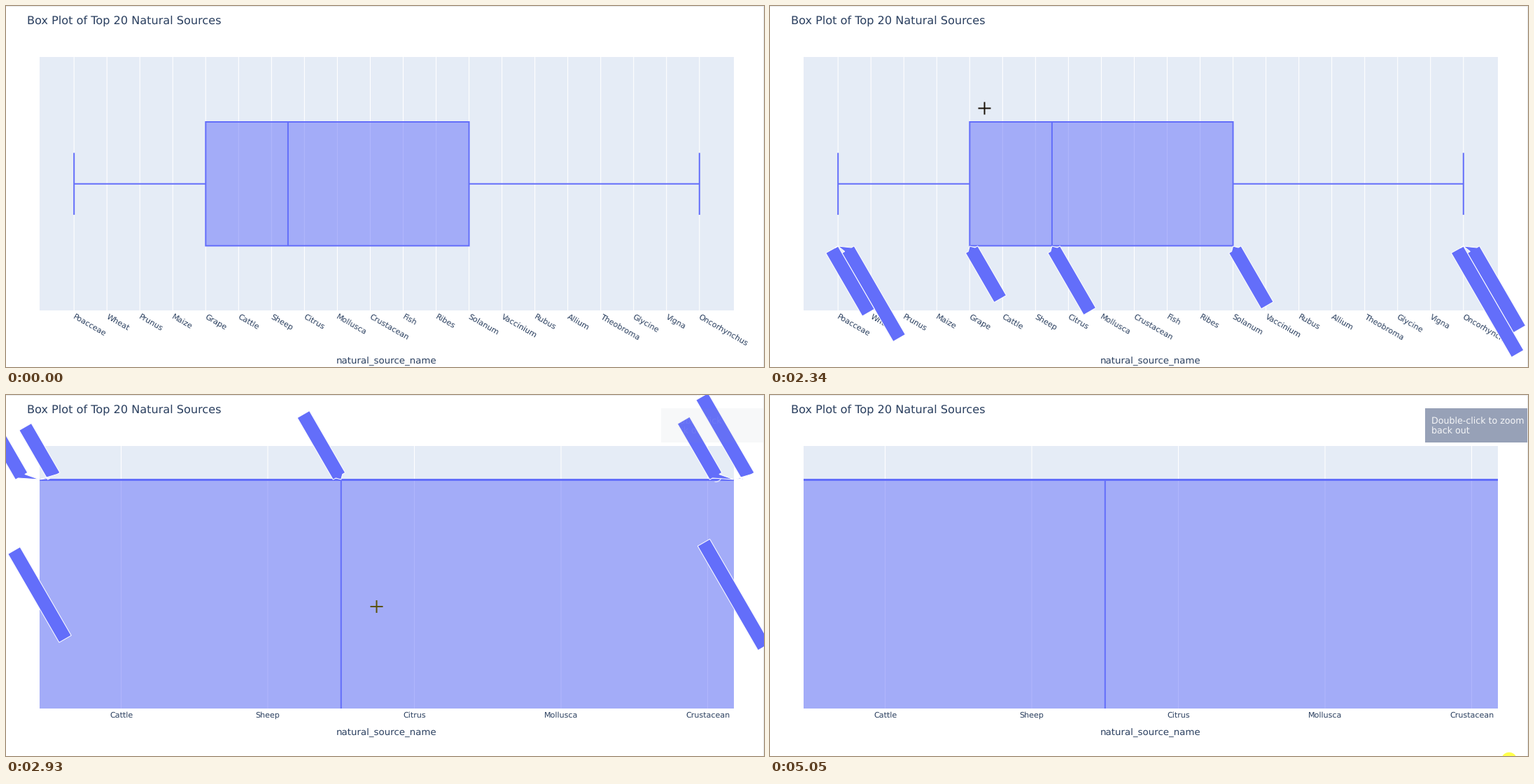
A matplotlib script that plays this animation: 1083x517 px, repeating every 5110 ms.

```python
import math

import numpy as np
import matplotlib.pyplot as plt
from matplotlib.animation import FuncAnimation
from matplotlib.colors import to_rgb
from matplotlib.patches import Circle, PathPatch, Polygon, Rectangle
from matplotlib.path import Path

plt.rcParams["text.hinting"] = "none"

W, H = 1083, 517
STEP, FRAMES = 35, 146
PX = 0.72  # points per pixel at 100 dpi

INK, PAPER, BLUE = "#2a3f5f", "#e5ecf6", "#636efa"
FILL = tuple(0.5 * a + 0.5 * b for a, b in zip(to_rgb(BLUE), to_rgb(PAPER)))
LEFT, TOP, RIGHT = 48, 73, 1040
WIDE_BOTTOM, ZOOM_BOTTOM = 436, 449
NAMES = ("Poacceae Wheat Prunus Maize Grape Cattle Sheep Citrus Mollusca "
         "Crustacean Fish Ribes Solanum Vaccinium Rubus Allium Theobroma "
         "Glycine Vigna Oncorhynchus").split()

# caption, category position, sideways steps when wide and when zoomed
STATS = [("(lower fence: Poacceae,  )", 0, 1, None),
         ("(min: Poacceae,  )", 0, -1, -2),
         ("(q1: Grape ,  )", 4, 0, 2),
         ("(median: Citrus,  )", 6.5, 0, 0),
         ("(q3: Solanum,  )", 12, 0, -2),
         ("(max: Oncorhynchus,  )", 19, 1, 2),
         ("(upper fence: Oncorhynchus,  )", 19, -1, None)]

# Times in ms
APPEAR, PRESS, DRAG, RELEASE, ZOOM, LAST_CLICK = 340, 2410, 2455, 2700, 2790, 5040
LAG = 22
HOME, ANCHOR = (1052, 530), (306.5, 146.5)
MOVES = [(APPEAR, 1110, (689, 385)), (1370, 1680, (441, 268)),
         (1920, 2300, ANCHOR), (DRAG, 2585, (529.5, 303)),
         (2990, 3420, (798, 350)), (3640, 3930, (947, 428)),
         (4270, 4540, (1056, 530))]

fig = plt.figure(figsize=(W / 100, H / 100), dpi=100, facecolor="white")
ax = fig.add_axes([0, 0, 1, 1])
ax.set_xlim(0, W)
ax.set_ylim(H, 0)
ax.axis("off")


def rect(x0, y0, x1, y1, color, z=1, **kw):
    return ax.add_patch(Rectangle((x0, y0), x1 - x0, y1 - y0, fc=color,
                                  lw=0, zorder=z, **kw))


def line(xs, ys, color=BLUE, width=2, z=3):
    return ax.plot(xs, ys, color=color, lw=width * PX, zorder=z, snap=False,
                   solid_capstyle="butt", solid_joinstyle="miter")[0]


def text(x, y, label, size, color=INK, z=2, font="DejaVu Sans", **kw):
    return ax.text(x, y, label, fontsize=size * PX, color=color, zorder=z,
                   family=font, va="baseline", rotation_mode="anchor", **kw)


def hover_label(tip, label, side=1, steps=0):
    """Tag turned by 60 degrees; side 1 hangs below, -1 rises, 0 is centred."""
    u = np.array([0.5, 0.75 ** 0.5])
    v = np.array([-u[1], u[0]])
    arrow, half, pad = 5.5, 10, 3.5
    caption = text(0, 0, label, 12, "white", 6, "Liberation Sans")
    length = caption.get_window_extent().width + 2 * pad
    shift = steps * half / u[1]
    along, across = shift * u[0], -shift * u[1]
    near = side * arrow + along if side else -length / 2
    far = near + (side or 1) * length
    pts = [(near, across + half), (far, across + half),
           (far, across - half), (near, across - half)]
    if side:
        pts = [(0, 0), (near, across + arrow)] + pts + [(near, across - arrow)]
    place = lambda a, b: np.array(tip) + a * u + b * v
    body = ax.add_patch(Polygon([place(*p) for p in pts], fc=BLUE, ec="white",
                                lw=PX, zorder=6))
    start = near + pad if side >= 0 else -arrow - pad
    caption.set(position=place(start, across + 4), rotation=-60,
                ha="left" if side >= 0 else "right")
    return [body, caption]


def view(first, step, bottom, box_top, box_bottom, title_y, tilt):
    """One box plot; all marks follow from the axis origin and step."""
    at = lambda i: first + step * i
    area = rect(LEFT, TOP, RIGHT, bottom, PAPER)
    marks, labels = [], []
    for i, name in enumerate(NAMES):
        x = at(i)
        if LEFT < x < RIGHT:
            marks.append(line([x, x], [TOP, bottom], "white", 1.1, 2))
            labels.append(text(x - 2, 447, name, 11.15, rotation=-30) if tilt
                          else text(x, 462, name, 11.15, ha="center"))
    low, q1, median, q3, high = map(at, (0, 4, 6.5, 12, 19))
    mid, cap = (box_top + box_bottom) / 2, (box_bottom - box_top) / 4
    marks += [rect(q1, box_top, q3, box_bottom, BLUE, 3, alpha=0.5),
              line([q1, q3, q3, q1, q1, q3],
                   [box_top, box_top, box_bottom, box_bottom, box_top, box_top]),
              line([median, median], [box_top, box_bottom])]
    for end, edge in ((low, q1), (high, q3)):
        marks += [line([end, edge], [mid, mid]),
                  line([end, end], [mid - cap, mid + cap])]
    for mark in marks:
        mark.set_clip_path(area)
    labels.append(text(544, title_y, "natural_source_name", 13.4, ha="center"))
    return [area] + marks + labels, at


def wide_labels(at):
    return sum([hover_label((at(i), 344), label, 1, steps)
                for label, i, steps, _ in STATS], [])


def zoomed_labels(at):
    tags = []
    for label, i, _, steps in STATS:
        x = min(max(at(i), LEFT), RIGHT)
        tags += (hover_label((x, 286), label, 0) if steps is None
                 else hover_label((x, 121), label, -1, steps))
    return tags


text(30, 26, "Box Plot of Top 20 Natural Sources", 16.1)
line([0, W], [0.5, 0.5], "#e6e8ea", 1)
line([1082.5, 1082.5], [0, H], "#e6e8ea", 1)

wide, wide_at = view(97.2, 47.03, WIDE_BOTTOM, 166, 343.4, 512, True)
zoomed, zoomed_at = view(-883, 209.5, ZOOM_BOTTOM, 121.5, 546, 487, False)
wide_tags, zoomed_tags = wide_labels(wide_at), zoomed_labels(zoomed_at)

notice = [rect(936, 19, 1082, 68, "#8c97af", 7),
          text(945, 41.5, "Double-click to zoom", 12.6, "white", 8),
          text(945, 56, "back out", 12.6, "white", 8)]

shade = ax.add_patch(PathPatch(Path([(0, 0), (1, 1)]), fc="black", lw=0,
                               zorder=4))
corners = [ax.add_patch(Polygon([(0, 0), (1, 1)], fc="white", ec="#444444",
                                lw=PX, zorder=5)) for _ in range(4)]
cross = [line([0], [0], z=9), line([0], [0], z=9)]
ARROW = np.array([(0, 0), (0, 15), (3.5, 12), (6, 17.5), (8, 16.5),
                  (5.7, 11.3), (10.5, 11)])
arrow = ax.add_patch(Polygon(ARROW, fc="white", ec="black", lw=PX, zorder=9))
ring = ax.add_patch(Circle((0, 0), 11.3, fc="yellow", lw=0, zorder=10))


def show(artists, on):
    for artist in artists:
        artist.set_visible(on)


def smooth(t):
    t = min(max(t, 0), 1)
    return t * t * (3 - 2 * t)


def pointer(t):
    spot = np.array(HOME, float)
    for start, end, goal in MOVES:
        spot += (np.array(goal) - spot) * smooth((t - start) / (end - start))
    return spot


def loop(x0, y0, x1, y1):
    return [(x0, y0), (x1, y0), (x1, y1), (x0, y1), (x0, y0)]


def draw_selection(t):
    """Draw the dragged rectangle and return how dark its surroundings are."""
    active = DRAG <= t < ZOOM
    show([shade] + corners, active)
    if not active:
        return 0
    fade = smooth((t - DRAG) / 200)
    x0, y0 = ANCHOR
    x1, y1 = np.maximum(pointer(t - LAG), (x0 + 1, y0 + 1))
    codes = [Path.MOVETO] + [Path.LINETO] * 3 + [Path.CLOSEPOLY]
    outside = loop(LEFT, TOP, RIGHT, WIDE_BOTTOM)
    shade.set_path(Path(outside + loop(x0, y0, x1, y1)[::-1], codes * 2))
    shade.set_alpha(0.4 * fade)
    arm = min(9, (x1 - x0) / 2, (y1 - y0) / 2)
    bracket = np.array([(-3.3, arm), (-0.5, arm), (-0.5, -0.5), (arm, -0.5),
                        (arm, -3.3), (-3.3, -3.3)])
    for k, patch in enumerate(corners):
        x, sx = ((x0, 1), (x1, -1))[k % 2]
        y, sy = ((y0, 1), (y1, -1))[k // 2]
        patch.set_xy(bracket * (sx, sy) + (x, y))
        patch.set_alpha(fade)
    return 0.4 * fade


def draw_pointer(t, x, y, in_plot, dim):
    present = t >= APPEAR
    show(cross, present and in_plot)
    show([arrow], present and not in_plot)
    arrow.set_xy(ARROW + (x, y))
    in_box = y > 121 if t >= ZOOM else 285 < x < 662 and 166 < y < 344
    under = FILL if in_box else to_rgb(PAPER)
    cross[0].set_data([x - 9, x + 9], [y, y])
    cross[1].set_data([x, x], [y - 9, y + 9])
    for bar in cross:
        bar.set_color([1 - c * (1 - dim) for c in under])
    last = t >= LAST_CLICK
    ring.set_visible(PRESS <= t < RELEASE or last)
    ring.center = (1056, 523) if last else (x, y)
    ring.set_alpha(0.7 if last else 0.5)


def update(i):
    t = i * STEP
    is_zoomed = t >= ZOOM
    x, y = pointer(t)
    in_plot = y < (ZOOM_BOTTOM if is_zoomed else WIDE_BOTTOM)
    show(wide, not is_zoomed)
    show(zoomed, is_zoomed)
    show(wide_tags, in_plot and t < PRESS)
    show(zoomed_tags, in_plot and t > ZOOM + STEP)
    opacity = smooth((t - ZOOM) / 700)
    show(notice, opacity > 0)
    for artist in notice:
        artist.set_alpha(0.9 * opacity)
    draw_pointer(t, x, y, in_plot, draw_selection(t))
    return []


anim = FuncAnimation(fig, update, frames=FRAMES, interval=STEP, repeat=True,
                     repeat_delay=0, init_func=lambda: update(0), blit=False)
plt.show()
```
